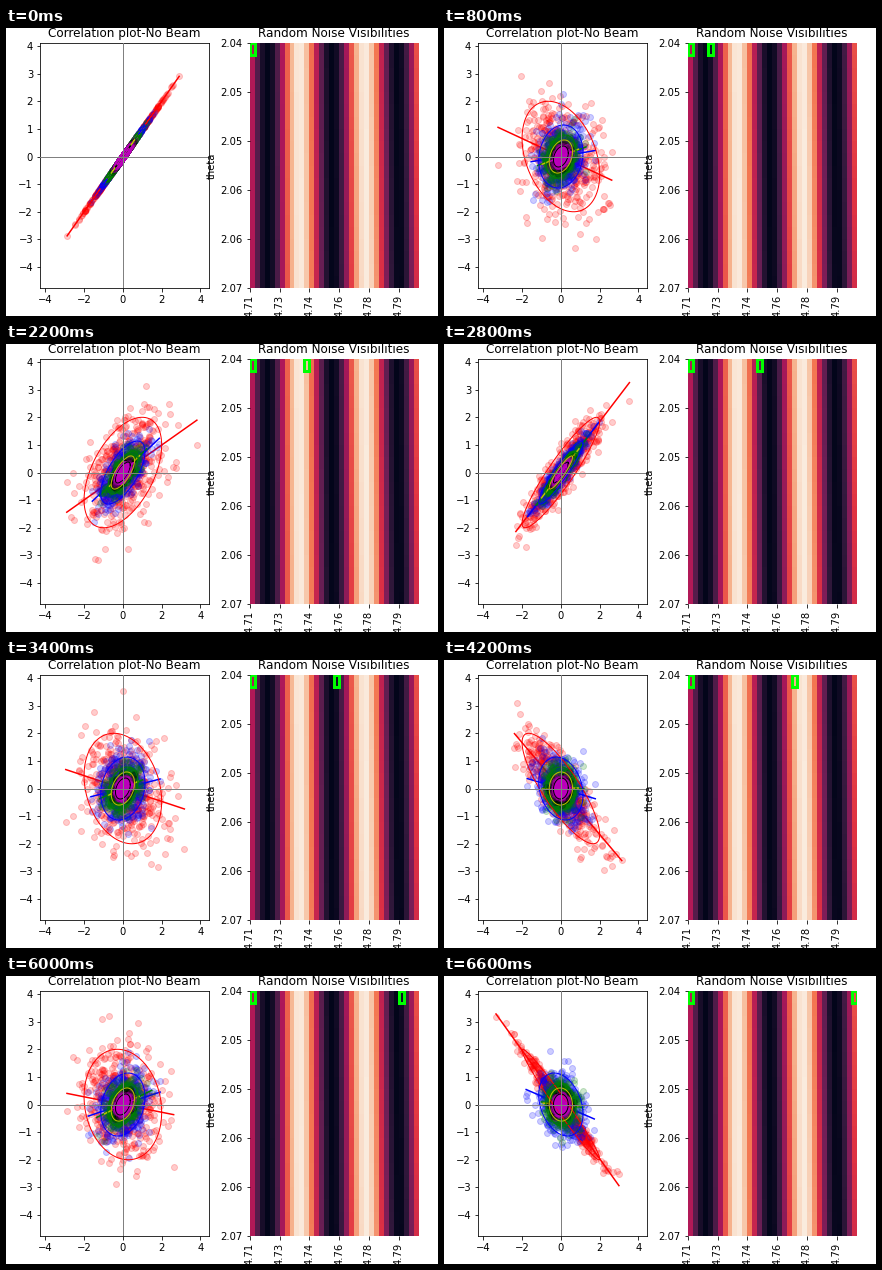
Animation of 432x288 px, one loop 6800 ms. Source, as a matplotlib script:

```python
import numpy as np
import matplotlib.pyplot as plt
from matplotlib.animation import FuncAnimation
from matplotlib.colors import LinearSegmentedColormap
from matplotlib.patches import Rectangle

W, H, DPI = 432, 288, 72
COLS, ROWS = 34, 20
PERIOD = 13.2          # fringe period in columns
POINTS = 500

plt.rcParams.update({"font.family": "DejaVu Sans", "font.size": 10})
fig = plt.figure(figsize=(W / DPI, H / DPI), dpi=DPI, facecolor="white")


def pixel_axes(left, top, right, bottom):
    return fig.add_axes([left / W, 1 - bottom / H,
                         (right - left) / W, (bottom - top) / H])


# Correlation panel
plot = pixel_axes(34.1, 15, 202.8, 260)
plot.set_xlim(-4.266, 4.43)
plot.set_ylim(-4.76, 4.11)
plot.set_xticks(range(-4, 5, 2))
plot.set_yticks(range(-4, 5))
plot.set_title("Correlation plot-No Beam", fontsize=12, pad=6)

# Fringe panel: the fringes widen slightly from top to bottom
rocket = LinearSegmentedColormap.from_list("fringe", [
    "#03051a", "#35193e", "#701f57", "#ad1759",
    "#e13342", "#f37651", "#f6b48f", "#faebdd"])
heat = pixel_axes(243.82, 15, 412.52, 260)
col, row = np.meshgrid(np.arange(COLS), np.arange(ROWS))
width = 13.08 * (1 + 0.0133 * row / ROWS)
fringe = 0.5 - 0.5 * np.sin(2 * np.pi * (col + 0.25) / width)
heat.pcolormesh(np.arange(COLS + 1), np.arange(ROWS + 1), fringe,
                cmap=rocket, vmin=0, vmax=1)
heat.set_xlim(0, COLS)
heat.set_ylim(ROWS, 0)
heat.set_xticks(range(0, COLS, 6),
                ["4.71", "4.73", "4.74", "4.76", "4.78", "4.79"], rotation=90)
heat.set_yticks(range(0, ROWS + 1, 4),
                ["2.04", "2.05", "2.05", "2.06", "2.06", "2.07"])
heat.set_ylabel("theta")
heat.set_title("Random Noise Visibilities", fontsize=12, pad=6)
for spine in heat.spines.values():
    spine.set_visible(False)


def cell_box():
    return heat.add_patch(Rectangle((0, 0), 1, 1, fill=False,
                                    edgecolor="lime", linewidth=3))


cell_box()
cursor = cell_box()


class Cloud:
    """Correlated point cloud with its fit line and two-sigma ellipse."""

    def __init__(self, color, sigma, offset, decay, dots, z):
        self.sigma, self.offset, self.decay = sigma, offset, decay
        self.dots, = plot.plot([], [], "o", color=color, ms=6, alpha=0.2,
                               zorder=z, visible=dots)
        self.line, = plot.plot([], [], color=color, lw=1.5, zorder=z + 0.1)
        self.ring, = plot.plot([], [], color=color, lw=1, zorder=z + 2)

    def update(self, step, rng):
        wave = np.cos(2 * np.pi * step / PERIOD)
        rho = self.offset + (1 - self.offset) * wave
        rho *= 1 - self.decay * step / 26
        rest = np.sqrt(max(0, 1 - rho * rho))
        x, noise = self.sigma * rng.standard_normal((2, POINTS))
        self.dots.set_data(x, rho * x + rest * noise)
        ends = np.array([x.min(), x.max()])
        self.line.set_data(ends, rho * ends)
        t = np.linspace(0, 2 * np.pi, 100)
        self.ring.set_data(2 * self.sigma * np.cos(t),
                           2 * self.sigma * (rho * np.cos(t) + rest * np.sin(t)))


# color, sigma, correlation offset, decay, dots shown
SPECS = [
    ("r", 1.0, 0.0, 0.015, True),
    ("b", 0.57, 0.34, 0.04, True),
    ("g", 0.39, 0.45, 0.06, True),
    ("y", 0.30, 0.47, 0.08, False),
    ("k", 0.19, 0.5, 0.1, True),
    ("m", 0.15, 0.5, 0.3, True),
]
clouds = [Cloud(*spec, z=2 + i * 0.3) for i, spec in enumerate(SPECS)]
plot.axhline(0, color="gray", lw=1, zorder=6)
plot.axvline(0, color="gray", lw=1, zorder=6)


def update(step):
    rng = np.random.default_rng(100 + step)
    for cloud in clouds:
        cloud.update(step, rng)
    cursor.set_x(step)
    return []


anim = FuncAnimation(fig, update, frames=COLS, interval=200,
                     repeat=True, repeat_delay=0, blit=False)
plt.show()
```
